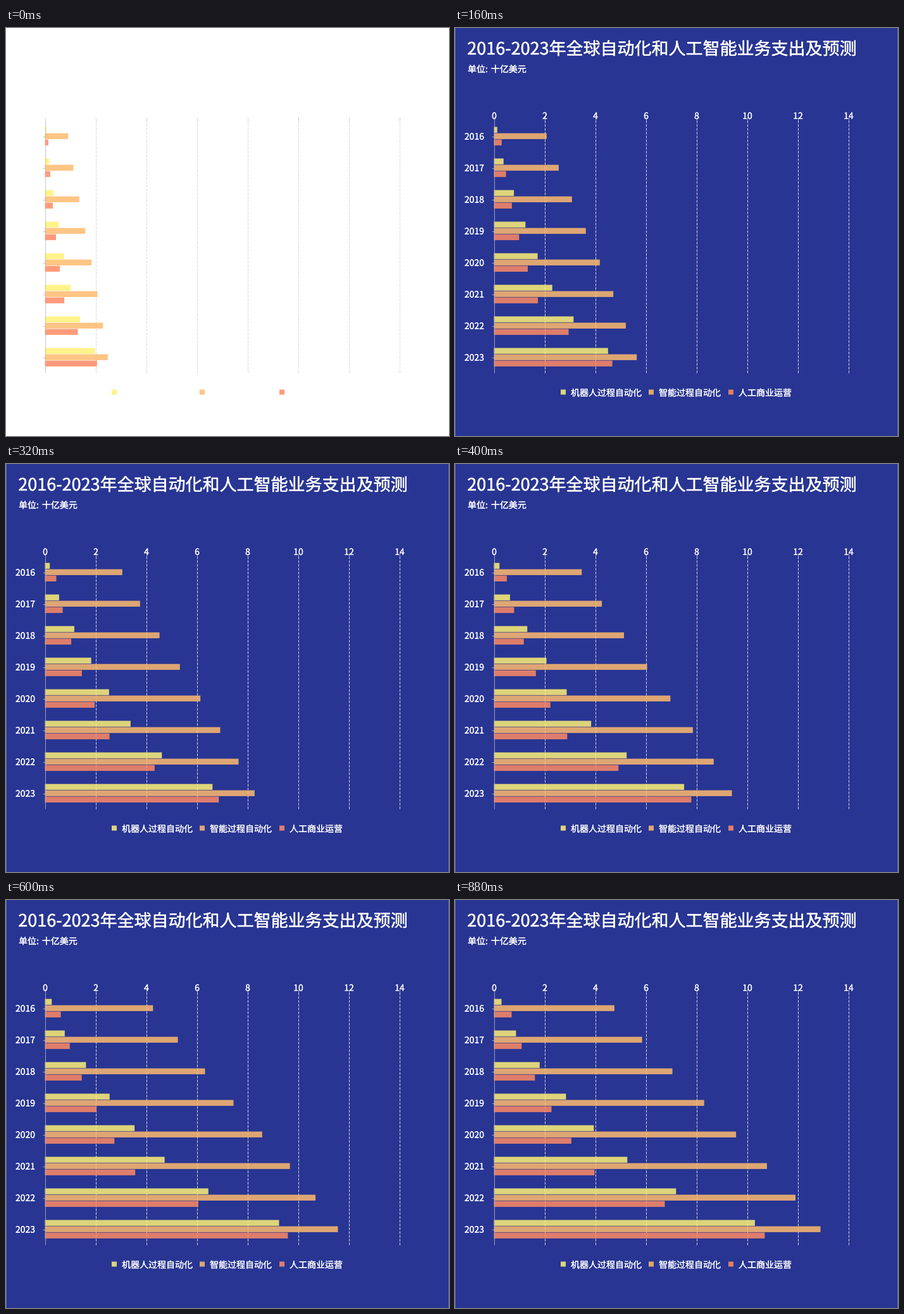
Write a matplotlib script that moves like this. It is 700 by 646 pixels and loops after 2880 ms.

```python
import numpy as np
import matplotlib.pyplot as plt
from matplotlib.animation import FuncAnimation
from matplotlib.patches import Rectangle
from matplotlib.patheffects import withStroke

W, H, DPI = 700, 646, 100
STEP, LOOP, GROW = 40, 2880, 880
PX = 72 / DPI
X0, UNIT = 61.5, 40
TOP, BOTTOM, ROW = 146, 546, 50

# spending as smooth curves over the years since 2016
n = np.arange(8)
robotic = 0.3 + 0.254 * n + 0.406 * n**2 - 0.0956 * n**3 + 0.0088 * n**4
smart = 4.76 + 1.023 * n + 0.0774 * n**2 - 0.0082 * n**3
business = 0.7 + 0.33 * n + 0.065 * n**2 + 1.73 * np.maximum(n - 5, 0) ** 1.38

SERIES = [
    ("机器人过程自动化", "#FFF176", 167, robotic),
    ("智能过程自动化", "#FFBB6E", 306, smart),
    ("人工商业运营", "#FF8A65", 432, business),
]

plt.rcParams["font.family"] = "Noto Sans CJK JP"
plt.rcParams["text.hinting"] = "none"
plt.rcParams["toolbar"] = "None"

fig = plt.figure(figsize=(W / DPI, H / DPI), dpi=DPI)
ax = fig.add_axes([0, 0, 1, 1])
ax.set_xlim(0, W)
ax.set_ylim(H, 0)
ax.axis("off")


def rect(x, y, w, h, color, z, alpha=1):
    patch = Rectangle((x, y), w, h, fc=color, lw=0, alpha=alpha, zorder=z, snap=False)
    return ax.add_patch(patch)


def line(xs, ys, color="#B8B8B8", z=2, style="-", alpha=0.8):
    ax.plot(xs, ys, color=color, lw=PX, ls=style, zorder=z, alpha=alpha,
            solid_capstyle="butt", dash_capstyle="butt")


def label(x, y, text, size=14, ha="left"):
    # a hairline stroke gives the medium weight
    ax.text(x, y, text, size=size * PX, color="white", ha=ha, va="baseline", zorder=5,
            path_effects=[withStroke(linewidth=size * 0.015 * PX, foreground="white")])


backdrop = rect(0, 0, W, H, "white", 0)
for x in (0, W - 1):
    rect(x, 0, 1, H, "white", 1, 0.25)

label(19.3, 42, "2016-2023年全球自动化和人工智能业务支出及预测", 27)
label(20, 70, "单位:")
label(56.8, 70, "十亿美元")

for value in range(0, 15, 2):
    x = X0 + value * UNIT
    if value:
        line([x, x], [TOP, BOTTOM], "#D9D9D9", style=(0, (4, 2)), alpha=1)
    line([x, x], [TOP - 5, TOP])
    label(x + 0.5, 144, str(value), ha="center")
line([X0, X0], [TOP, BOTTOM], z=4)

for row in n:
    y = TOP + ROW * (row + 0.5) + 0.5
    line([X0 - 4, X0], [y, y])
    label(46, y + 5.2, str(2016 + row), ha="right")

bars = []
for k, (name, color, x, values) in enumerate(SERIES):
    rect(x, 572.5, 8, 8, color, 3, 0.85)
    label(x + 16, 582.5, name)
    for row, value in enumerate(values):
        y = TOP + ROW * row + 10 * (k + 1) + 0.6
        bars.append((rect(X0, y, 0, 9.3, color, 3, 0.85), value * UNIT))


def growth(ms):
    # ease-out, already under way when the loop starts
    left = 0.888 * (1 - min(ms / GROW, 1))
    return 1 - left**1.8


def draw(i):
    backdrop.set_facecolor("#283593" if i else "white")
    p = growth(i * STEP)
    for bar, width in bars:
        bar.set_width(width * p)
    return []


anim = FuncAnimation(fig, draw, frames=LOOP // STEP, init_func=lambda: draw(0),
                     interval=STEP, repeat=True, repeat_delay=0)
plt.show()
```
